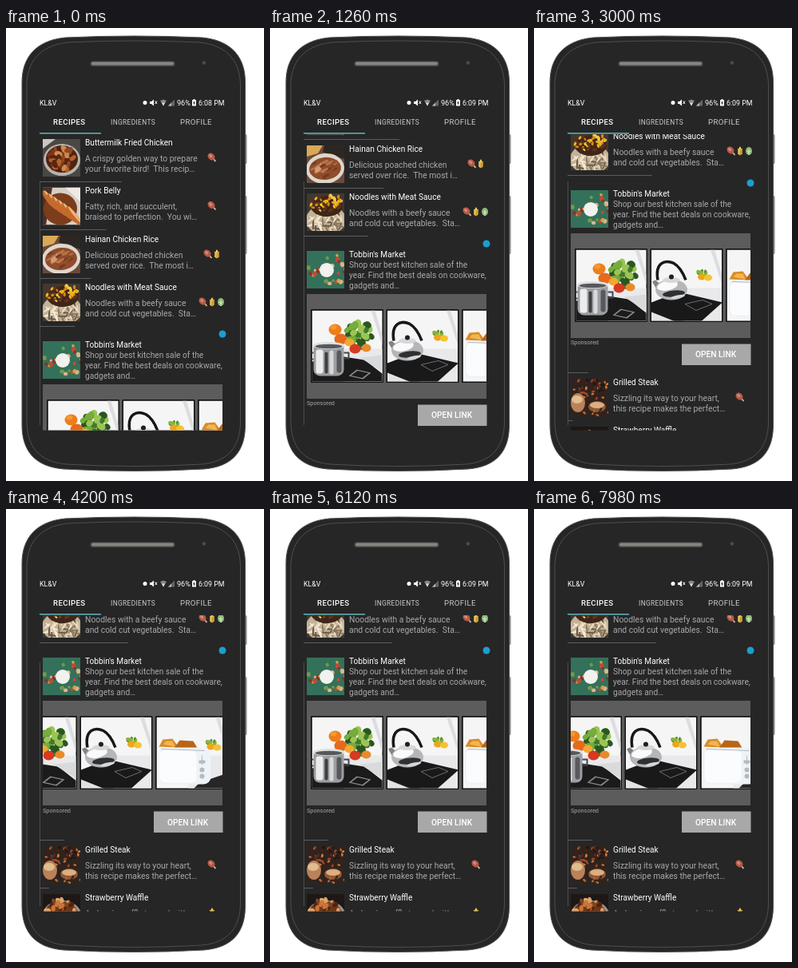
An HTML page with a canvas for the animation above (8 s loop, 323x567 px).

```html
<!DOCTYPE html>
<html lang="en">
<head>
<meta charset="utf-8">
<title>Recipe app</title>
<style>
html, body { margin: 0; width: 100%; height: 100%; overflow: hidden; background: #fff; }
canvas { display: block; width: 323px; height: 567px; }
</style>
</head>
<body>
<canvas id="stage"></canvas>
<script>
const LOOP = 8000, WIDTH = 323, HEIGHT = 567;
const BODY = '#262626', GREY = '#a9a9a9';
const canvas = document.getElementById('stage');
const ratio = window.devicePixelRatio || 1;
canvas.width = WIDTH * ratio;
canvas.height = HEIGHT * ratio;
const ctx = canvas.getContext('2d');

const SCROLL = [[0, 0], [1260, 113], [2070, 144], [3000, 189], [3700, 206], [8000, 206]];
const SWIPE = [[0, 0], [3500, 0], [4200, 53], [4900, 94], [5200, 94], [5950, 0], [6400, 0], [7980, 32], [8000, 32]];

// Monotone cubic interpolation through [time, value] keys
function follow(keys, t) {
  const rate = i => (keys[i + 1][1] - keys[i][1]) / (keys[i + 1][0] - keys[i][0]);
  const slope = i => {
    if (i === 0 || i === keys.length - 1) return 0;
    const a = rate(i - 1), b = rate(i);
    return a * b > 0 ? 2 * a * b / (a + b) : 0;
  };
  let i = 0;
  while (i < keys.length - 2 && t >= keys[i + 1][0]) i++;
  const [t0, v0] = keys[i], [t1, v1] = keys[i + 1];
  const d = t1 - t0, u = (t - t0) / d;
  const h = u * u * (3 - 2 * u);
  return v0 + (v1 - v0) * h + d * u * (1 - u) * (slope(i) * (1 - u) - slope(i + 1) * u);
}

function random(seed) {
  seed *= 104729;
  return () => (seed = (seed * 16807) % 2147483647) / 2147483647;
}
function rect(color, x, y, w, h, r = 0) {
  ctx.fillStyle = color;
  ctx.beginPath();
  ctx.roundRect(x, y, w, h, r);
  ctx.fill();
}
function oval(color, x, y, rx, ry = rx, turn = 0) {
  ctx.fillStyle = color;
  ctx.beginPath();
  ctx.ellipse(x, y, rx, ry, turn, 0, 7);
  ctx.fill();
}
function poly(color, ...p) {
  ctx.fillStyle = color;
  ctx.beginPath();
  for (let i = 0; i < p.length; i += 2) ctx.lineTo(p[i], p[i + 1]);
  ctx.fill();
}
function curve(color, width, path) {
  ctx.strokeStyle = color;
  ctx.lineWidth = width;
  ctx.stroke(new Path2D(path));
}
function text(str, x, y, size, color = '#fff', weight = 400, spacing = 0) {
  ctx.font = `${weight} ${size}px Roboto, sans-serif`;
  ctx.letterSpacing = spacing + 'px';
  ctx.fillStyle = color;
  ctx.fillText(str, x, y);
}
function inside(x, y, w, h, paint) {
  ctx.save();
  ctx.beginPath();
  ctx.rect(x, y, w, h);
  ctx.clip();
  ctx.translate(x, y);
  paint();
  ctx.restore();
}
function scatter(seed, count, colors, x, y, spreadX, spreadY, size, flat = 0.6, turn = null) {
  const rnd = random(seed);
  for (let i = 0; i < count; i++) {
    const a = rnd() * 6.28, r = Math.sqrt(rnd()), s = size * (0.6 + rnd() * 0.6);
    oval(colors[i % colors.length], x + Math.cos(a) * r * spreadX, y + Math.sin(a) * r * spreadY,
      s, s * flat, turn ?? rnd() * 3);
  }
}

// Thumbnails, 47 by 47
const photos = {
  fried() {
    rect('#4a4744', 0, 0, 47, 47);
    poly('#c9c5c0', 0, 0, 16, 0, 0, 12);
    oval('#b9b4ae', 24, 26, 23, 20);
    oval('#4c2414', 24, 25, 20, 17);
    scatter(11, 34, ['#7d3517', '#b4622d', '#5a2512', '#93471f', '#cf8a50'], 24, 24, 17, 14, 5);
  },
  pork() {
    rect('#d7cfc6', 0, 0, 47, 47);
    poly('#4b3126', 0, 0, 12, 0, 4, 47, 0, 47);
    oval('#7c3d1c', 22, 27, 21, 20);
    for (let i = 0; i < 6; i++) {
      oval('#c56a2c', 9 + i * 6, 16 + i * 4, 15, 4, 0.9);
      oval('#efb67c', 10 + i * 6, 14 + i * 4, 13, 1.8, 0.9);
    }
    poly('#eee9e2', 28, 0, 47, 0, 47, 18);
  },
  hainan() {
    rect('#6b4a38', 0, 0, 47, 47);
    poly('#2d2724', 22, 0, 47, 0, 47, 17, 20, 8);
    poly('#d9a957', 0, 0, 20, 0, 14, 10, 0, 14);
    oval('#ded6cc', 23, 29, 24, 19, -0.1);
    oval('#8d4c2b', 23, 29, 20, 14, -0.1);
    scatter(31, 30, ['#b87248', '#944e2b', '#d39c72', '#743a20'], 23, 29, 17, 11, 4.5, 0.35, -0.5);
  },
  noodles() {
    rect('#413831', 0, 0, 47, 47);
    oval('#c4b297', 24, 33, 25, 19);
    scatter(17, 40, ['#eadbbf', '#8d7a61', '#f5ead5', '#6c5a47'], 24, 36, 22, 11, 6, 0.18);
    oval('#3f2619', 25, 16, 20, 13);
    scatter(41, 44, ['#f0b21c', '#d48913', '#5d321b', '#f5c94a'], 25, 13, 21, 13, 3);
  },
  market() {
    rect('#34715a', 0, 0, 47, 47);
    scatter(23, 24, ['#d9a13f', '#c34a35', '#74994b', '#d8b48b', '#8f2f2a'], 24, 24, 25, 24, 2.8, 0.85);
    oval('#f1f1ee', 25, 24, 9);
  },
  steak() {
    rect('#30221d', 0, 0, 47, 47);
    scatter(29, 40, ['#a4492a', '#5c2b1c', '#d17a3c', '#1f1714'], 27, 12, 24, 14, 2.4);
    oval('#b98258', 9, 30, 9, 12);
    oval('#e1bc8c', 8, 26, 7, 5);
    oval('#8e5835', 33, 35, 11, 7);
    oval('#dcae80', 33, 33, 9, 4);
    scatter(43, 12, ['#3a241a', '#b56a3c'], 30, 42, 18, 4, 2.4);
  },
  waffle() {
    rect('#1d1715', 0, 0, 47, 47);
    oval('#96908a', 24, 26, 24, 18);
    oval('#6c3717', 23, 23, 20, 14);
    scatter(37, 34, ['#c9743a', '#81421c', '#e0a26a', '#4d2412'], 23, 20, 18, 13, 4);
  }
};

function kitchen() {
  rect('#f5f5f6', 0, 0, 89, 90);
  poly('#dcdde0', 74, 0, 79, 0, 89, 34, 89, 46);
  poly('#e9e9ec', 40, 48, 89, 48, 89, 90, 40, 90);
}
function peppers(x, y) {
  scatter(13, 8, ['#4f8f2f', '#86b53c'], x, y - 4, 8, 3, 3.5);
  oval('#eda51d', x - 4, y + 1, 5, 4);
  oval('#f5c234', x + 4, y + 2, 5, 4);
}

// Carousel pictures, 89 by 90
const cards = [
  function pot() {
    kitchen();
    scatter(19, 34, ['#3f7a2c', '#76ac3c', '#2a5721', '#9cc455'], 59, 30, 18, 15, 5, 0.8);
    oval('#ee7d1c', 29, 24, 8, 7);
    oval('#f49a2e', 27, 21, 4, 3);
    oval('#e56a1a', 36, 36, 8, 7);
    oval('#f2a832', 47, 40, 6, 5);
    oval('#d63a20', 54, 48, 7, 6);
    oval('#e98a2a', 68, 47, 6, 5);
    poly('#1c1b1c', 0, 64, 40, 58, 66, 62, 89, 80, 89, 90, 0, 90);
    poly('#d9dadc', 60, 59, 89, 56, 89, 77);
    poly('#8b8c8f', 56, 74, 74, 78, 64, 86, 46, 82);
    poly('#1c1b1c', 57, 75.5, 71, 78.5, 63, 84.5, 49, 81.5);
    rect('#9c9ea1', 2, 45, 38, 37, [1, 1, 8, 8]);
    rect('#ececed', 5, 49, 9, 30, 3);
    rect('#3d3e40', 16, 52, 4, 27, 2);
    rect('#d8d9db', 22, 50, 5, 30, 2);
    rect('#57595c', 31, 50, 6, 28, 3);
    oval('#dfe0e2', 21, 44, 20, 4.5);
    oval('#56585b', 21, 45, 17, 2.8);
    curve('#44464a', 2, 'M2 53h-5v8h5M40 53h6v7h-6');
  },
  function kettle() {
    kitchen();
    peppers(67, 33);
    poly('#19191a', 0, 66, 34, 53, 89, 66, 62, 90, 0, 90);
    poly('#e2e3e5', 0, 78, 30, 90, 0, 90);
    curve('#6c6d70', 1, 'M42 68L64 63L76 68L56 76Z');
    poly('#808286', 8, 52, 1, 40, 5, 38, 15, 46);
    oval('#b4b6b9', 25, 50, 20, 13);
    oval('#fafafa', 20, 45, 13, 6, -0.2);
    oval('#2f3032', 28, 55, 14, 4, -0.1);
    oval('#d5d7d9', 33, 59, 9, 2, -0.2);
    oval('#d5d7d9', 25, 38, 11, 3.5);
    oval('#202020', 25, 34, 3);
    curve('#171717', 3.5, 'M8 38C4 16 17 12 28 17Q37 22 43 38');
  },
  function toaster() {
    kitchen();
    peppers(72, 36);
    poly('#262628', 54, 82, 89, 70, 89, 90, 46, 90);
    poly('#d98b25', 3, 37, 8, 28, 20, 27, 28, 38);
    poly('#b96518', 22, 39, 29, 29, 46, 30, 52, 40);
    poly('#f1b552', 8, 34, 12, 30, 20, 30, 23, 37);
    rect('#eef3f7', 2, 38, 66, 46, 9);
    rect('#fbfcfd', 4, 41, 46, 41, 7);
    curve('#b4b8bd', 1, 'M6 40L60 42M57 48V60');
    rect('#b6b9be', 53, 54, 8, 4, 1);
    oval('#b6b9be', 57, 66, 3);
    oval('#b6b9be', 57, 74, 3);
  }
];

const icons = {
  drumstick(x, y) {
    curve('#d9b8a4', 1.8, `M${x + 1} ${y + 1}L${x + 4.5} ${y + 5}`);
    oval('#b55a47', x - 1, y - 1, 5, 4, 0.8);
    oval('#d48a76', x - 1.8, y - 1.8, 2.4, 1.6, 0.8);
  },
  wheat(x, y) {
    curve('#b88a2c', 1, `M${x} ${y - 3}V${y + 5.5}`);
    for (let i = 0; i < 3; i++) {
      oval('#e6c04e', x - 1.4, y - 1.5 + i * 2.3, 2, 1.2, 0.8);
      oval('#cfa238', x + 1.4, y - 1.5 + i * 2.3, 2, 1.2, -0.8);
    }
    oval('#f0cf62', x, y - 3.5, 1.2, 2);
  },
  leaf(x, y) {
    oval('#8dbb78', x, y, 4, 5);
    curve('#e4f0d8', 1, `M${x} ${y - 2}V${y + 5}M${x - 2} ${y}L${x} ${y + 2}L${x + 2} ${y}`);
  }
};

const recipes = [
  { y: 139, photo: 'fried', title: 'Buttermilk Fried Chicken', tags: { drumstick: 258 },
    lines: ['A crispy golden way to prepare', 'your favorite bird!  This recip…'] },
  { y: 199.5, photo: 'pork', title: 'Pork Belly', tags: { drumstick: 258 },
    lines: ['Fatty, rich, and succulent,', 'braised to perfection.  You wi…'] },
  { y: 260, photo: 'hainan', title: 'Hainan Chicken Rice', tags: { drumstick: 253, wheat: 264 },
    lines: ['Delicious poached chicken', 'served over rice.  The most i…'] },
  { y: 320, photo: 'noodles', title: 'Noodles with Meat Sauce', tags: { drumstick: 247, wheat: 258, leaf: 269 },
    lines: ['Noodles with a beefy sauce', 'and cold cut vegetables.  Sta…'] },
  { y: 628, photo: 'steak', title: 'Grilled Steak', tags: { drumstick: 258 },
    lines: ['Sizzling its way to your heart,', 'this recipe makes the perfect…'] },
  { y: 688, photo: 'waffle', title: 'Strawberry Waffle', tags: { wheat: 258 },
    lines: ['A classic waffle topped with', 'fresh strawberries and…'] }
];

function drawRecipe({ y, photo, title, lines, tags }) {
  inside(46, y, 47, 47, photos[photo]);
  text(title, 99, y + 8, 10.15);
  lines.forEach((line, i) => text(line, 99, y + 27.7 + i * 13, 10.35, GREY));
  for (const tag in tags) icons[tag](tags[tag], y + 23);
}

function drawAd(swipe) {
  oval('#1b9fd0', 271, 383, 4.5);
  inside(46, 392, 47, 47, photos.market);
  text('Tobbin\'s Market', 99, 400, 10.15);
  ['Shop our best kitchen sale of the', 'year. Find the best deals on cookware,', 'gadgets and…']
    .forEach((line, i) => text(line, 99, 412.7 + i * 13, 10.2, GREY));
  rect('#5c5c5c', 46, 446, 225, 131);
  inside(46, 446, 225, 131, () => {
    for (let i = 0; i < 4; i++) {
      const x = 6.5 + i * 94.5 - swipe;
      rect('#111', x - 1.5, 19, 91, 92, 1);
      inside(x, 20.5, 88, 89, cards[i % 3]);
    }
  });
  text('Sponsored', 46, 585.5, 7.3, GREY);
  rect('#a8a8a8', 185, 584.5, 86.5, 26.5);
  text('OPEN LINK', 202, 601.5, 10.2, '#fff', 500);
}

function drawPhone() {
  rect('#8a8a8a', 298, 133, 3.5, 37, 1.5);
  rect('#8a8a8a', 298, 210, 3.5, 73, 1.5);
  const body = new Path2D('M20 68C20 38 36 16 74 12Q160 8 246 12C284 16 299.5 38 299.5 68V497C299.5 529 284 549 248 552Q160 557 72 552C36 549 20 529 20 497Z');
  ctx.fillStyle = BODY;
  ctx.fill(body);
  ctx.strokeStyle = '#505050';
  ctx.lineWidth = 1;
  ctx.stroke(body);
  // Seam between the rim and the front glass
  ctx.save();
  ctx.translate(159.75, 282);
  ctx.scale(0.957, 0.978);
  ctx.translate(-159.75, -282);
  ctx.stroke(body);
  ctx.restore();
  rect('#4a4a4a', 105.5, 41.5, 106, 6.5, 3);
  rect('#86867f', 107, 42.5, 103, 4, 2);
  oval('#4c4c4c', 248, 43.5, 2.3);
  rect('#4c4c4c', 42, 192, 1, 305);
}

function drawHeader(t) {
  text('KL&V', 42, 97, 8.9);
  oval('#fff', 174, 93.5, 2.5);
  poly('#fff', 180, 92, 182, 92, 185, 89.5, 185, 97.5, 182, 95, 180, 95);
  curve('#fff', 1, 'M186.5 91.5L189 95M189 91.5L186.5 95');
  poly('#888', 193, 91, 197, 89.5, 201, 91, 197, 97.5);
  poly('#ddd', 195, 93.5, 199, 93.5, 197, 97.5);
  poly('#666', 203, 97.5, 211, 89.5, 211, 97.5);
  poly('#bbb', 203, 97.5, 207, 93.5, 207, 97.5);
  text('96%', 214, 97, 9.1);
  rect('#fff', 233, 90, 5, 7.5, 0.5);
  rect('#fff', 234.5, 89, 2, 1);
  rect('#333', 234.7, 92, 1.6, 3.5);
  text(t < 400 ? '6:08 PM' : '6:09 PM', 241, 97, 8.8);
  text('RECIPES', 59, 121, 9.6, '#fff', 500, 0.4);
  text('INGREDIENTS', 131, 120.5, 8.4, '#ccc', 400, 0.35);
  text('PROFILE', 218, 121, 9.6, '#ccc', 400, 0.4);
  rect('#5fb5b9', 42, 131, 77, 1.6);
}

function drawList(t) {
  const scroll = follow(SCROLL, t);
  ctx.save();
  ctx.beginPath();
  ctx.rect(42, 133, 235, 370.5);
  ctx.clip();
  // Dividers end where the glare crosses the glass
  for (const y of [192.5, 253, 314, 373.5, 620.5, 680.5]) {
    const top = Math.round(y - scroll - 0.5);
    const end = 162 - (top - 139) * 0.323;
    if (end > 42) rect('#5c5c5c', 42, top, end - 42, 1);
  }
  ctx.translate(0, -scroll);
  recipes.forEach(drawRecipe);
  drawAd(follow(SWIPE, t));
  ctx.restore();
}

function frame() {
  const t = performance.now() % LOOP;
  ctx.setTransform(ratio, 0, 0, ratio, 0, 0);
  rect('#fff', 0, 0, WIDTH, HEIGHT);
  drawPhone();
  drawHeader(t);
  drawList(t);
  requestAnimationFrame(frame);
}
frame();
</script>
</body>
</html>
```
